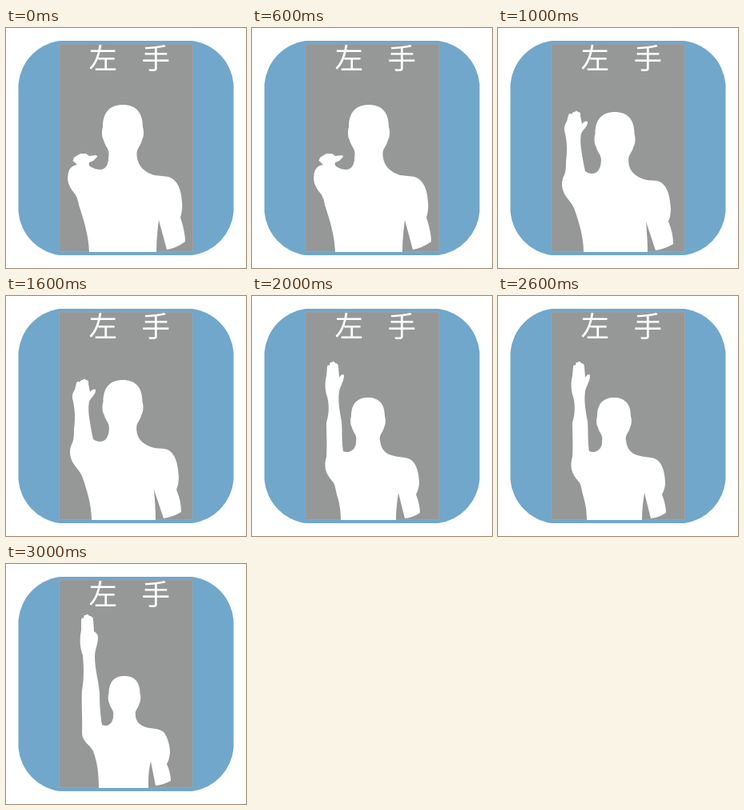
Write an HTML page that moves like this. It is 300x300 px and loops after 4000 ms.

```html
<!DOCTYPE html>
<html lang="zh">
<head>
<meta charset="utf-8">
<title>左手</title>
<style>
  html, body { margin: 0; width: 100%; height: 100%; overflow: hidden; background: #fff; }
  svg { display: block; width: 100vw; height: 100vh; }
  text { font: 500 35.5px "Noto Sans CJK SC", "Noto Sans CJK JP", "Noto Sans CJK", sans-serif; text-anchor: middle; }
</style>
</head>
<body>
<svg viewBox="0 0 300 300">
  <path fill="#70a7cb" d="M67 16 H233 A60 60 0 0 1 284.5 70 V230 A60 60 0 0 1 233 284 H67 A60 60 0 0 1 15.5 230 V70 A60 60 0 0 1 67 16Z"/>
  <rect id="panel" y="20" height="259.5" fill="#969897" stroke="#a3a9aa" stroke-width=".6"/>
  <g fill="#fff">
    <text x="121.3" y="51.3">左</text>
    <text x="187.3" y="51.3">手</text>
    <path id="head" d="M-17.5 70 V60 C-18 54 -22 52 -24 44 C-26.5 40 -26.5 32 -25 28 C-25 9 -16 0 0 0 C16 0 25 9 25 28 C26.5 32 26.5 40 24 44 C22 52 18 54 17.5 60 V70Z"/>
    <path id="body"/>
  </g>
</svg>
<script>
const STEP = 1000;

// panel: [left, right]; head: [centre x, top, scale]; body: raised arm, then shoulders and lowered arm
const poses = [
  {
    panel: [67, 233.5], head: [146, 96, 1],
    body: `M104 280 C103 258 98 243 91 221 C90 215 88 209 85 206 C79 199 76 191 77.5 184 C78 176 82 172 89 171
      L86 168 L83.5 166 L85 162 L88 160 L93 157 L100 157 L104 160 L113 159 L114 161 L109 166 L104 168
      C103 171 104 173 107 174 C112 177 118 178 122 176 Q128 173 128.5 160 L163.5 160
      C165 173 173 180 185 184 C192 185 198 185 203 186 C215 190 219 202 220 218 Q221 227 218 237
      C221 246 224 257 224 267 Q213 275 201 277 L191 240 C189 255 188 268 188 280Z`
  },
  {
    panel: [66.5, 233], head: [146, 105, .98],
    body: `M107 280 C107 262 102 245 95 225 C91 217 87 214 84 209 C80 202 79 195 81 188 C85 181 85 174 85 166
      C87 153 86 142 84 132 C82 126 83 121 86 117 L88 109 Q90 105 92 108 Q94 104 96 105 Q98 102 100 105
      Q104 105 103 110 L105 120 Q109 115 112 117 C113 122 107 126 104 132
      C102 142 104 152 106 164 C107 170 108 175 109 179 C113 182 118 183 122 181 Q128 178 129 167 L163 167
      C164 180 173 187 186 190 C192 191 197 190 202 192 C212 197 215 210 216 227 Q216 235 213 242
      C217 251 219 261 219 270 Q209 276 197 278 L185 242 C186 255 187 267 187 280Z`
  },
  {
    panel: [67, 233.5], head: [145, 127, .84],
    body: `M111 280 C111 267 109 258 106 248 C104 240 104 235 100 231 C93 223 89 214 93 201 C94 187 93 171 93 158
      C96 149 97 137 94 126 C91 118 91 107 93 100 L94 88 Q95 85 97 87 Q97 82 100 83 Q102 80 104 84
      Q108 84 108 89 L109 102 Q113 96 115 99 C115 107 110 113 109 119
      C107 132 110 146 112 157 C113 171 112 183 114 194 C118 196 122 195 125 193 Q130 190 130.5 180 L160 180
      C161 192 167 198 178 200 C186 202 193 201 199 205 C206 210 209 223 209 235 Q208 243 205 248
      C208 256 210 264 210 271 Q201 277 191 278 L183 246 C181 258 180 269 180 280Z`
  },
  {
    panel: [66.5, 233], head: [148, 140, .78],
    body: `M116 280 C116 262 114 247 109 234 C105 226 95 222 95 211 C96 199 94 173 95 158
      C98 142 97 127 96 114 C92 104 92 92 94 83 L94 70 Q95 66 97 68 Q97 63 100 64 Q102 61 104 65
      Q109 65 109 70 L110 84 Q115 87 115 92 C115 100 111 107 111 115
      C111 133 116 146 117 162 C117 178 118 190 120 201 C124 203 128 202 130 200 Q134 197 134.5 187 L161.5 187
      C162 199 169 203 179 205 C187 206 192 206 197 210 C202 216 205 227 205 236 Q204 245 201 250
      C204 257 206 264 206 271 Q197 276 187 277 L181 247 C178 258 178 268 178 280Z`
  }
];

const [panel, head, body] = ["panel", "head", "body"].map(id => document.getElementById(id));
let shown = -1;

function draw(time) {
  const index = Math.floor(time / STEP) % poses.length;
  if (index === shown) return;
  shown = index;
  const pose = poses[index];
  const [left, right] = pose.panel;
  const [x, y, scale] = pose.head;
  panel.setAttribute("x", left);
  panel.setAttribute("width", right - left);
  head.setAttribute("transform", `translate(${x} ${y}) scale(${scale})`);
  body.setAttribute("d", pose.body);
}

const start = performance.now();
function tick() {
  draw(performance.now() - start);
  requestAnimationFrame(tick);
}
tick();
</script>
</body>
</html>
```
